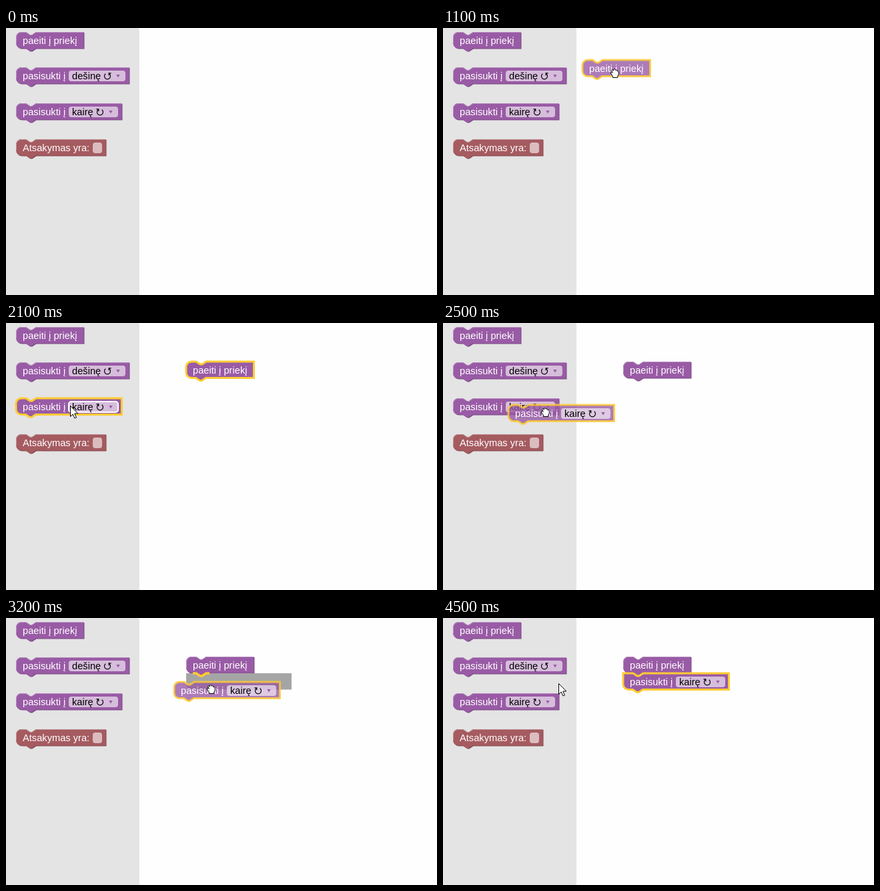
Animation, 646 px wide and 401 px high, one loop 4700 ms. Source, as an HTML page:

```html
<!DOCTYPE html>
<html lang="lt">
<head>
<meta charset="utf-8">
<title>Blokų dėliojimas</title>
<style>
  html, body { margin: 0; width: 100%; height: 100%; overflow: hidden; background: #fefefe; }
  svg { display: block; width: 646px; height: 401px; }
  text { font: 14.667px "Liberation Sans", Arial, sans-serif; fill: #fff; }
  .field text { fill: #000; }
  .field rect { fill: #fff; fill-opacity: .6; }
  .field.hover rect { stroke: #fff; stroke-width: 2; }
  .icon { fill: none; stroke: #000; stroke-width: 1.15; }
  .light { fill: none; stroke-width: 1; }
  .selected > .body { stroke: #fc3; stroke-width: 3; }
  .selected > .light, .selected > .dark { display: none; }
  .dragging > .body { fill-opacity: .8; stroke-opacity: .8; }
  .cursor { fill: #fff; stroke: #000; stroke-linejoin: round; }
</style>
</head>
<body>
<svg id="stage" viewBox="0 0 646 401"></svg>
<script>
const LOOP = 4700, TICK = 100, HEIGHT = 24.5;
const PURPLE = { fill: '#995ba5', dark: '#7a4984', light: '#b88cc0' };
const RED = { fill: '#a55b60', dark: '#84494d', light: '#c08c90' };

const forward = { label: 'paeiti į priekį', width: 101.5, color: PURPLE };
const right = { label: 'pasisukti į', width: 169.5, color: PURPLE, field: { text: 'dešinę', width: 85, flip: 1 } };
const left = { label: 'pasisukti į', width: 158.5, color: PURPLE, field: { text: 'kairę', width: 74, flip: -1 } };
const answer = { label: 'Atsakymas yra:', width: 134.5, color: RED, socket: true };

const notch = 'H15l6 4 3 0 6-4';

function outline(width, square) {
  const start = square ? 'M0 0' : 'M0 8A8 8 0 0 1 8 0';
  return `${start}${notch}H${width}V${HEIGHT}H29.5l-6 4-3 0-6-4H8a8 8 0 0 1-8-8z`;
}

function fieldMarkup({ text, width, flip }) {
  return `<g class="field" transform="translate(79 5)">
    <rect width="${width}" height="16" rx="4"/>
    <text x="5" y="13">${text}</text>
    <g class="icon" transform="translate(${width - 27} 8.2) scale(${flip} 1)">
      <path d="M-2.7-3.5A4.5 4.5 0 1 0 2.7-3.5M5.6-4.4H2.2V-1"/></g>
    <path d="M${width - 13.7} 6h5.4l-2.7 4.6z" fill="${PURPLE.fill}"/></g>`;
}

function blockMarkup(id, x, y, block, square = false) {
  const { color, width } = block;
  const path = outline(width, square);
  const corner = square ? 'V.5' : 'V8A7.5 7.5 0 0 1 8 .5';
  return `<g id="${id}" transform="translate(${x} ${y})">
    <path class="dark" d="${path}" transform="translate(1 1)" fill="${color.dark}"/>
    <path class="body" d="${path}" fill="${color.fill}"/>
    <path class="light" d="M.5 ${HEIGHT - 8}${corner}H15l6 4 3 0 6-4H${width}" stroke="${color.light}"/>
    <text x="10" y="18">${block.label}</text>
    ${block.field ? fieldMarkup(block.field) : ''}
    ${block.socket ? '<rect x="115" y="5" width="14" height="16" rx="4" fill="#fff" fill-opacity=".6"/>' : ''}
  </g>`;
}

const stage = document.getElementById('stage');
stage.innerHTML = `
  <path d="M0 0H197a3 3 0 0 1 3 3V401H0z" fill="#e4e4e4"/>
  ${blockMarkup('homeForward', 15, 6, forward)}
  ${blockMarkup('homeRight', 15, 59, right)}
  ${blockMarkup('homeLeft', 15, 113, left)}
  ${blockMarkup('homeAnswer', 15, 167, answer)}
  ${blockMarkup('placedForward', 270, 58, forward)}
  ${blockMarkup('placedLeft', 270, 83, left, true)}
  <g id="preview" transform="translate(270 83)">
    <path d="${outline(158, true)}" fill="#a5a5a5"/>
    <path d="M10 0h5l6 4 3 0 6-4h5" fill="none" stroke="#fc3" stroke-width="3.5"/>
  </g>
  ${blockMarkup('dragForward', 15, 6, forward)}
  ${blockMarkup('dragLeft', 15, 113, left)}
  <path id="arrow" class="cursor" d="M.5.5v16l3.7-3.5 2.8 6 2.5-1.1-2.7-5.9h5z"/>
  <path id="hand" class="cursor" d="M-3.5 6.5v-2l-3-4.5q-.5-2 1.5-1.8l1.2 1.2-1.5-3.6q.5-2 2.2-.6l.7 1v-1.8q1.2-1.6 2.4 0l.4 1q1-1.4 2.2 0l.4 1.5q1.6-1 2.2.6v4l-1.5 3.5v1.5z"/>`;

const part = {};
stage.querySelectorAll('[id]').forEach(node => part[node.id] = node);
['dragForward', 'dragLeft'].forEach(id => part[id].classList.add('selected', 'dragging'));
const leftField = part.homeLeft.querySelector('.field');

// Pointer waypoints: time, x, y.
const pointer = [
  [200, 2, 55], [600, 54, 30], [700, 63, 26], [800, 72, 28], [900, 125, 40],
  [1100, 258, 68], [1200, 289, 72], [1300, 309, 75], [1400, 309, 75], [1500, 319, 78],
  [1600, 308, 82], [1900, 150, 119], [2000, 108, 124], [2100, 96, 124], [2300, 70, 124],
  [2400, 98, 127], [2600, 207, 140], [2700, 207, 140], [2800, 265, 137], [3000, 285, 126],
  [3200, 307, 107], [3300, 320, 90], [3400, 320, 90], [3500, 312, 91], [3700, 304, 93],
  [3800, 304, 93], [4100, 275, 132], [4200, 254, 147], [4300, 229, 140], [4400, 203, 120],
  [4500, 173, 98]
];

function pointerAt(t) {
  const next = pointer.findIndex(p => p[0] > t);
  if (next < 0) return pointer[pointer.length - 1].slice(1);
  if (next === 0) return pointer[0].slice(1);
  const [t0, x0, y0] = pointer[next - 1], [t1, x1, y1] = pointer[next];
  const k = (t - t0) / (t1 - t0);
  return [Math.round(x0 + (x1 - x0) * k), Math.round(y0 + (y1 - y0) * k)];
}

const move = (node, x, y) => node.setAttribute('transform', `translate(${x} ${y})`);
const show = (node, on) => node.style.display = on ? '' : 'none';

function draw(t) {
  const [x, y] = pointerAt(t);
  const during = (from, to) => t >= from && t < to;
  const dragForward = during(800, 1600), dragLeft = during(2300, 3500);
  const dragging = dragForward || dragLeft;

  show(part.dragForward, dragForward);
  show(part.dragLeft, dragLeft);
  move(part.dragForward, 15 + x - 64, 6 + y - 26);
  move(part.dragLeft, 15 + x - 70, 113 + y - 124);

  show(part.placedForward, t >= 1600);
  show(part.placedLeft, t >= 3500);
  show(part.preview, during(3200, 3500));
  part.homeForward.classList.toggle('selected', during(600, 800));
  part.homeLeft.classList.toggle('selected', during(1900, 2300));
  part.placedForward.classList.toggle('selected', during(1600, 2300));
  part.placedLeft.classList.toggle('selected', t >= 3500);
  leftField.classList.toggle('hover', during(1900, 2200));

  show(part.arrow, t >= 200 && !dragging);
  show(part.hand, dragging);
  move(part.arrow, x, y);
  move(part.hand, x + (dragLeft ? 1 : 0), y);
}

const start = performance.now();
let shown = -1;
function frame() {
  const elapsed = Math.max(0, performance.now() - start) % LOOP;
  const t = Math.floor(elapsed / TICK) * TICK;
  if (t !== shown) draw(shown = t);
  requestAnimationFrame(frame);
}
frame();
</script>
</body>
</html>
```
